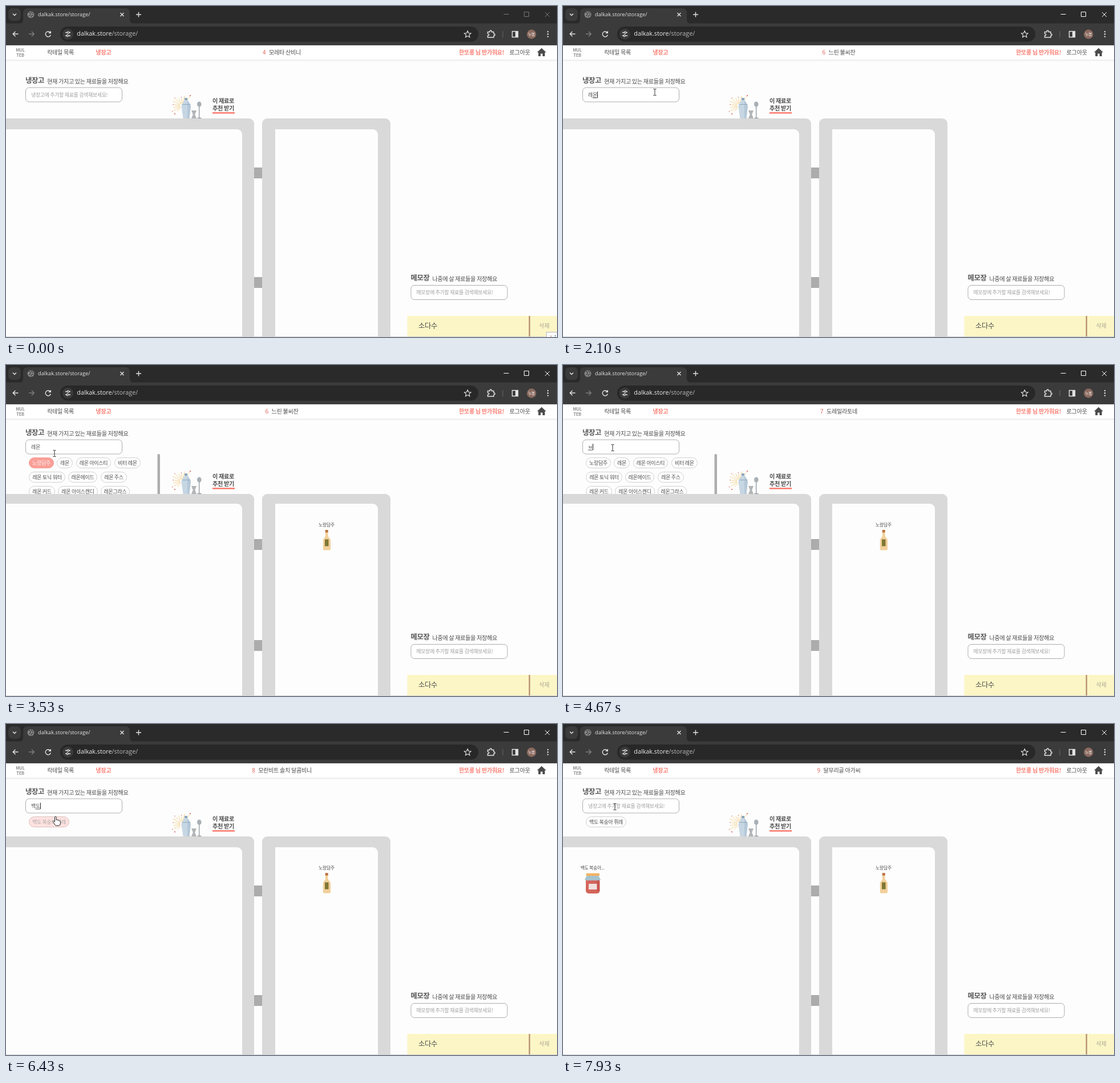
Recreate the animation shown at these times as an HTML page with a canvas. Size 966 by 580 pixels, loop 8000 ms.

```html
<!DOCTYPE html>
<html lang="ko">
<head>
<meta charset="utf-8">
<title>냉장고</title>
<style>
html, body { margin: 0; width: 100%; height: 100%; overflow: hidden; background: #fdfdfd; }
canvas { display: block; }
</style>
</head>
<body>
<canvas id="stage" width="966" height="580" lang="ko"></canvas>
<script>
const c = document.getElementById('stage').getContext('2d');
const LOOP = 8000;
const KO = '"Noto Sans CJK KR", "Noto Sans CJK JP", "Noto Sans CJK", sans-serif';
const LATIN = '"Open Sans", "Noto Sans", sans-serif';
const INK = '#4c4c4c', HEADING = '#585858', CORAL = '#fb7d72', GREY = '#d9d9d9', PAGE = '#fdfdfd';

// Drinks shown one after another in the header, starting at rank 4
const RANKS = ['모레타 산비니', '은하수길 달빛소다', '느린 불씨잔', '도레밀라토네', '모란비트 솔치 달콤비니', '달무리골 아가씨'];
const LIQUEUR = '노랑담주';
const LEMON_CHIPS = [
  [LIQUEUR, 40, 0, 44], ['레몬', 89, 0, 28], ['레몬 아이스티', 123, 0, 61], ['비터 레몬', 190, 0, 46],
  ['레몬 토닉 워터', 40, 1, 64], ['레몬에이드', 109, 1, 51], ['레몬 주스', 166, 1, 46],
  ['레몬 커드', 40, 2, 46], ['레몬 아이스캔디', 91, 2, 70], ['레몬그라스', 166, 2, 51]
];
const PEACH_CHIPS = [['백도 복숭아 퓌레', 40, 0, 71]];

const TYPING = [
  [0, ''], [1490, 'ㄹ'], [1560, '레'], [1630, '렘'], [1830, '레모'], [1900, '레몬'], [4540, ''],
  [4670, 'ㅂ'], [4800, '배'], [4870, '백'], [5070, '백ㄷ'], [5210, '백도'], [7800, '백'], [7930, '']
];
const CARET_ON = [[830, 1360], [1490, 2430], [2960, 3250], [3880, 4410], [4670, 5740], [6270, 6600], [7400, 7930]];
const COMPOSING = [[1490, 3250], [4670, 6600]];
const POINTER = [
  [70, 952, 574], [800, 161, 151], [2460, 161, 151], [2630, 134, 151], [3020, 70, 169], [3280, 70, 169],
  [3530, 85, 155], [3840, 87, 145], [6220, 87, 145], [6430, 87, 163], [6560, 86, 168], [7050, 86, 168], [7380, 91, 145]
];

const within = (t, spans) => spans.some(([a, b]) => t >= a && t < b);
const latest = (t, steps) => steps.filter(s => s[0] <= t).pop();
const clamp = v => Math.max(0, Math.min(1, v));
const ease = v => v * v * (3 - 2 * v);
const fade = (t, on, off) => ease(clamp((t - on) / 260)) * (1 - ease(clamp((t - off) / 320)));
const mix = (a, b, k) => `rgb(${a.map((v, i) => Math.round(v + (b[i] - v) * k))})`;

function text(s, x, y, size, color = INK, weight = 400, align = 'left', family = KO) {
  c.font = `${weight} ${size}px ${family}`;
  c.letterSpacing = family === KO ? `${-0.03 * size}px` : '0px';
  c.textAlign = align;
  c.textBaseline = 'middle';
  c.fillStyle = color;
  c.fillText(s, x, y);
  return c.measureText(s).width;
}

function rect(x, y, w, h, color) {
  c.fillStyle = color;
  c.fillRect(x, y, w, h);
}

function round(x, y, w, h, r, fill, stroke) {
  c.beginPath();
  c.roundRect(x, y, w, h, r);
  if (fill) { c.fillStyle = fill; c.fill(); }
  if (stroke) { c.strokeStyle = stroke; c.lineWidth = 1; c.stroke(); }
}

function disc(x, y, r, color) {
  c.beginPath();
  c.arc(x, y, r, 0, Math.PI * 2);
  c.fillStyle = color;
  c.fill();
}

function shape(d, fill, stroke, width = 1.3, x = 0, y = 0) {
  const p = new Path2D(d);
  c.save();
  c.translate(x, y);
  if (fill) { c.fillStyle = fill; c.fill(p); }
  if (stroke) { c.strokeStyle = stroke; c.lineWidth = width; c.stroke(p); }
  c.restore();
}

function browser(active) {
  const light = '#e3e3e3', bar = '#3b3b3b';
  rect(0, 0, 966, 31, '#2a2a2a');
  rect(0, 30.5, 966, 37.5, bar);
  rect(0, 68, 966, 1, '#505050');
  round(4, 4, 22, 22, 7, bar);
  shape('M12 13.5l3 3 3-3', null, light, 1.5);
  shape('M23 31q7 0 7-7V12q0-8 8-8h171q8 0 8 8v12q0 7 7 7z', bar);
  disc(43.5, 15, 6, '#858585');
  shape('M39 11q4 0 4 3t-3 3M44 20q0-4 4-4M44 9q0 3 4 4', null, '#4c4c4c', 1.4);
  c.save();
  c.beginPath();
  c.rect(50, 8, 140, 12.5);
  c.clip();
  text('dalkak.store/storage/', 56, 15.8, 9.26, light, 400, 'left', LATIN);
  c.restore();
  shape('M200.5 12l6 6m0-6l-6 6M228 15h9m-4.5-4.5v9', null, light, 1.4);
  const ctl = active ? '#ffffff' : '#777777';
  shape('M872.5 14.5h9M908.5 10.5h8v8h-8zM945 11l8 8m0-8l-8 8', null, ctl, 1);

  shape('M21.5 49h-9m4-4.3L12.2 49l4.3 4.3', null, light, 1.4);
  shape('M40 49h9m-4-4.3l4.3 4.3-4.3 4.3', null, '#7d7d7d', 1.4);
  shape('M77.5 46.5a4.6 4.6 0 1 0 .8 4M78.3 44v3.4h-3.5', null, light, 1.4);
  round(95, 36, 733, 26.5, 13, '#282828');
  disc(108.5, 49.3, 9.5, bar);
  shape('M104 46.5h3m4 0h2M104 52h2m4 0h3', null, light, 1.3);
  shape('M107.5 46.5a1.6 1.6 0 1 0 3.2 0a1.6 1.6 0 1 0-3.2 0M106.2 52a1.6 1.6 0 1 0 3.2 0a1.6 1.6 0 1 0-3.2 0', null, light, 1.2);
  const w = text('dalkak.store', 124.3, 49.3, 10.8, '#ececec', 400, 'left', LATIN);
  text('/storage/', 124.3 + w, 49.3, 10.8, '#b9b9b9', 400, 'left', LATIN);
  shape('M809.3 43.7l1.7 3.8 4.1.4-3.1 2.7.9 4.1-3.6-2.1-3.6 2.1.9-4.1-3.1-2.7 4.1-.4z', null, light, 1.2);
  shape('M844.5 45.5h3.5q0-2.5 1.8-2.5t1.8 2.5h3.5v3.3q2 0 2 1.6t-2 1.6v3h-10.6v-3q2.3-.2 2.3-1.7t-2.3-1.7z', null, light, 1.4);
  rect(870.5, 44, 1, 11, '#666666');
  shape('M887.5 44.5h10v10h-10z', null, light, 1.4);
  rect(893, 44, 5, 11, light);
  disc(921.3, 49.5, 8.2, '#8b6a5f');
  text('누봄', 921.3, 49.5, 6.6, '#ffffff', 400, 'center');
  for (const y of [45, 49.3, 53.6]) disc(950, y, 1.2, light);
}

function siteHeader(t) {
  rect(0, 69, 966, 26, '#ffffff');
  rect(0, 94.5, 966, 1, '#dcdcdc');
  rect(0, 95.5, 966, 1, '#f4f4f4');
  text('MUL', 25, 77, 7.4, '#8e8e8e', 700, 'center');
  text('TEB', 25, 86.3, 7.4, '#8e8e8e', 700, 'center');
  text('칵테일 목록', 72, 81, 10.1, INK, 500);
  text('냉장고', 157.3, 81, 10.1, CORAL, 700);
  const i = Math.floor((t + 900) / 1500);
  c.font = `400 10.1px ${KO}`;
  c.letterSpacing = '-0.303px';
  const x = 483.5 - (c.measureText(RANKS[i]).width + 11) / 2;
  text(i + 4, x, 81.5, 10.1, '#e0685e');
  text(RANKS[i], x + 11, 81.5, 10.1);
  text('한또롱 님 반가워요!', 794, 81, 10.1, CORAL, 700);
  text('로그아웃', 882.5, 81, 10.2);
  shape('M939 73.8l8 7.4h-2.3V88h-4v-4.6h-3.4V88h-4v-6.8H931z', '#4a4a4a');
}

function field(x, y, hint, value, caret, composing) {
  round(x + .5, y + .5, 169, 25, 6, '#ffffff', '#adadad');
  const left = x + 10, mid = y + 13;
  if (!value) text(hint, left, mid, 8.9, '#9f9f9f');
  const w = value ? text(value, left, mid, 8.9, '#505050') : 0;
  if (composing && value) rect(left + w - 8, mid + 5, 8, 1, '#505050');
  if (caret) rect(Math.round(left + w), mid - 5.5, 1, 11, '#222222');
}

function chip([label, x, row, w], heat) {
  const y = 162 + row * 25, hot = [250, 152, 144];
  round(x + .5, y + .5, w - 1, 18, 9, mix([255, 255, 255], hot, heat), mix([208, 208, 208], hot, heat));
  text(label, x + w / 2, y + 9.3, 8.95, mix([76, 76, 76], [255, 250, 248], Math.sqrt(heat)), 400, 'center');
}

function barTools(y) {
  c.save();
  c.translate(0, y);
  // Sparks fan out to the left of the shaker
  for (let i = 0; i < 9; i++) {
    const a = 2.3 + i * .33, far = 13 + (i * 5) % 7;
    const dx = Math.cos(a), dy = Math.sin(a);
    shape(`M${309 + dx * 4} ${-22 + dy * 4}L${309 + dx * far} ${-22 + dy * far}`, null, '#f2cf86', .9);
    if (i % 2) disc(309 + dx * (far + 2), -22 + dy * (far + 2), .8, '#dd6a62');
  }
  shape('M317 -31L323 -40', null, '#f1d596', .9);
  disc(323, -40, 1.1, '#dd5a55');
  disc(296, -8, 1.1, '#dd5a55');
  shape('M313 -36h5v4l3 4 2 4q1.5 2 .5 6L321.5 0h-11l-2.5-18q-1.5-4 .5-6l2-4 2.5-4z', '#c6d6e3');
  shape('M318 -32l3 4 2 4q1.5 2 .5 6L321.5 0h-3.5z', '#b5c8d8');
  shape('M313 -36h5v4h-5z', '#8da6bc');
  shape('M308.5 -24.5h15', null, '#91a8bb', 1);
  shape('M325 -14h9l-2.8 7 2.8 7h-9l2.8-7z', '#b2b5b7');
  shape('M338.7 -24V-1M335.5 -.7h7', null, '#8f979d', 1.3);
  shape('M335 -25a3.8 4.5 0 1 1 7.6 0q0 4-3.8 5q-3.8-1-3.8-5', '#a9b0b5');
  text('이 재료로', 362, -30.5, 10.1, INK, 700);
  text('추천 받기', 362, -18, 10.1, INK, 700);
  rect(362, -11, 39, 2.6, CORAL);
  c.restore();
}

function bottle(y) {
  text(LIQUEUR, 562, y + 55, 7.8, INK, 400, 'center');
  shape('M560 0h4.4v9q.2 2 2.7 5q1.9 2 1.9 4v15q0 2-2 2h-9.2q-2 0-2-2V18q0-2 1.9-4q2.5-3 2.3-5z', '#f2d09b', null, 1, 0, y + 64.5);
  rect(559.7, y + 64, 5, 4.5, '#bd7442');
  rect(559, y + 80.5, 6.5, 12, '#7f7734');
}

function jar(y) {
  text('백도 복숭아...', 51.7, y + 55, 7.8, INK, 400, 'center');
  round(40, y + 73, 24.5, 27, 5, '#d4655b');
  rect(59, y + 76, 5, 20, '#c6564f');
  shape('M42 0h20l4 8q-2 2-4.7.5q-2.5 2-5 0q-2.5 2-5 0q-2.5 2-5 0q-2.5 2-5 0q-2 .5-3.3-.5z', '#a5c3ce', null, 1, 0, y + 68);
  round(40.5, y + 64.5, 23.5, 4.5, 1.5, '#f4b263');
  rect(45, y + 83, 14.5, 10, '#f0e0dc');
}

function fridge(top, t) {
  // The doors shrink a little when they are pushed down
  const k = (560 - top) / 363, at = v => Math.round(top + v * k);
  round(-20, top, 455, 420, 9, GREY);
  round(-20, at(19), 434, 420, 9, PAGE);
  round(449, top, 225, 420, 9, GREY);
  round(472, at(19), 180, 420, [0, 9, 0, 0], PAGE);
  for (const v of [86, 278]) rect(435, at(v), 14, 19, '#acacac');
  const shelf = top === 197 ? top : top - 1;
  if (t >= 3320) bottle(shelf);
  if (t >= 6730) jar(shelf);
}

function memo() {
  text('메모장', 709.5, 476.5, 12.4, HEADING, 700);
  text('나중에 살 재료들을 저장해요', 747.5, 478, 10.1);
  field(709.5, 489, '메모장에 추가할 재료를 검색해보세요!');
  rect(703.5, 543, 263, 37, '#fcf6c6');
  rect(916.5, 543, 2.5, 37, '#ba9575');
  text('소다수', 723, 560.5, 12.4);
  text('삭제', 934.5, 560.5, 10.1, '#aba693');
}

function pointer(t) {
  if (t < 70) return;
  const i = POINTER.filter(p => p[0] <= t).length - 1;
  const [t0, x0, y0] = POINTER[i], [t1, x1, y1] = POINTER[i + 1] || [LOOP, x0, y0];
  const k = ease((t - t0) / (t1 - t0));
  const x = x0 + (x1 - x0) * k, y = y0 + (y1 - y0) * k;
  const top = t < 2500 ? 143 : 131;
  if (x > 34 && x < 203 && y > top && y < top + 26) {
    shape('M-2.5 -5.5h2l.5.5.5-.5h2M0 -5v10M-2.5 5.5h2l.5-.5.5.5h2', null, '#303030', 1, x, y);
  } else if (t > 2500 && x < 112 && y >= 162 && y < 181) {
    shape('M-1.5 .5q0-1.5 1.3-1.5t1.3 1.5V5q2.3-.7 2.7.7q2.2-.4 2.6 1q2-.2 2 1.6V11q0 4-3 4H1q-1.5 0-2.5-2L-4.5 8.5q-.5-1.5 1-1.7l2 1.7z', '#ffffff', '#222222', 1, x, y);
  } else {
    shape('M0 0v12l2.7-2.5 2 4.5 2-.9-2-4.3h3.7z', '#ffffff', '#222222', .9, x, y);
  }
}

function draw(t) {
  const open = t >= 2500, lemon = open && t < 5870;
  const dy = open ? -12 : 0, top = lemon ? 226 : 197;
  rect(0, 0, 966, 580, PAGE);
  browser(t >= 800);
  siteHeader(t);

  text('냉장고', 34, 130.5 + dy, 12.4, HEADING, 700);
  text('현재 가지고 있는 재료들을 저장해요', 72, 132 + dy, 10.1);
  field(34, 142.5 + dy, '냉장고에 추가할 재료를 검색해보세요!', latest(t, TYPING)[1], within(t, CARET_ON), within(t, COMPOSING));

  if (open) {
    const heat = lemon ? fade(t, 2860, 3480) : fade(t, 6340, 7080);
    (lemon ? LEMON_CHIPS : PEACH_CHIPS).forEach((item, i) => chip(item, i ? 0 : heat));
  }
  if (lemon) round(265.5, 156, 4.5, 90, 2, '#adadad');
  barTools(top);
  fridge(top, t);
  memo();
  rect(0, 579, 966, 1, '#d3d3d3');
  if (t < 70) {
    round(947.5, 571.5, 30, 20, 0, '#fafafa', '#b9b3c2');
    rect(954, 578, 3, 1, '#c48a8a');
    rect(962, 577, 2, 2, '#8a8a9a');
  }
  pointer(t);
}

function tick() {
  draw(performance.now() % LOOP);
  requestAnimationFrame(tick);
}
tick();
</script>
</body>
</html>
```
